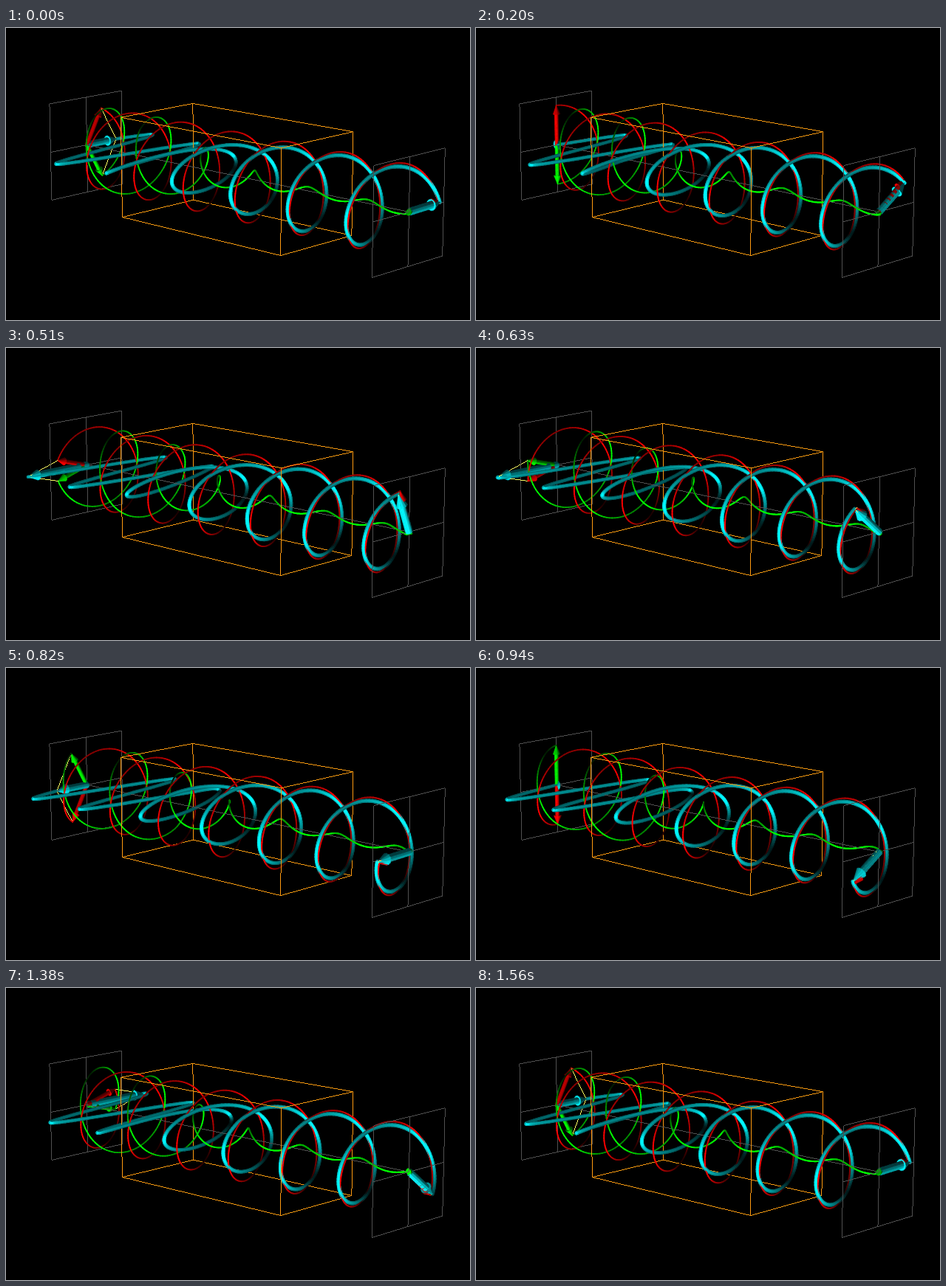
Recreate the animation shown at these times as an HTML page with a canvas. Size 628 by 396 pixels, loop 1620 ms.

```html
<!DOCTYPE html>
<html>
<head>
<meta charset="utf-8">
<style>
html, body { margin: 0; width: 100%; height: 100%; overflow: hidden; background: #000; }
canvas { display: block; }
</style>
</head>
<body>
<canvas id="stage" width="628" height="396"></canvas>
<script>
const ctx = document.getElementById('stage').getContext('2d');
const RAD = Math.PI / 180, LOOP = 1620;
const RADIUS = 0.83, START = 60, PHASE = 2200, TWIST = 32, DECAY = 5.1, DEPTH = 8.7;
const BOX = [0.249, 0.7465];
const LIGHT = [-0.83, -0.42, 0.36], VIEW = [0.61, -0.22, -0.76];
const RED = [255, 0, 0], GREEN = [0, 255, 0], CYAN = [0, 248, 255];
const GREY = '#505050', ORANGE = '#ff9a10', YELLOW = '#ffff60';
let items = [];

// x and y span the wave planes (-1..1), z runs along the axis (0..1)
function project([x, y, z]) {
  const w = 1 + 0.0168 * x - 0.0057 * y - 0.146 * z;
  return [(109 + 50.1 * x - 1.8 * y + 356.4 * z) / w,
          (158 - 7.2 * x - 65.1 * y + 54.6 * z) / w, w];
}
const dot = (a, b) => a[0] * b[0] + a[1] * b[1] + a[2] * b[2];
const unit = v => v.map(c => c / (Math.hypot(...v) || 1));
const mix = (a, b, t) => a.map((c, i) => c + (b[i] - c) * t);
const tint = (rgb, i) => `rgb(${rgb.map(c => Math.round(c * Math.min(1, i)))})`;

function addLine(a, b, color, width, bias = 0) {
  const p = project(a), q = project(b);
  items.push({ p: [p, q], color, width, w: (p[2] + q[2]) / 2 + bias });
}
function addWire(a, b, color, parts = 24) {
  for (let i = 0; i < parts; i++) addLine(mix(a, b, i / parts), mix(a, b, (i + 1) / parts), color, 1);
}
function addFace(points, normal, rgb) {
  if (dot(normal, VIEW) > 0) return;
  const p = points.map(project);
  const light = 0.25 + 0.85 * Math.max(0, dot(unit(normal), LIGHT));
  items.push({ p, color: tint(rgb, light), w: p.reduce((s, q) => s + q[2], 0) / p.length });
}

// The medium absorbs the green wave and shifts both phases in opposite ways
function fields(z, step) {
  const inside = Math.min(BOX[1] - BOX[0], Math.max(0, z - BOX[0]));
  const a = START + 15 * step - PHASE * z, shift = TWIST * inside;
  const fade = RADIUS * Math.exp(-DECAY * inside);
  const polar = (r, deg) => [r * Math.cos(deg * RAD), r * Math.sin(deg * RAD), z];
  const red = polar(RADIUS, a - shift), green = polar(fade, -a - shift);
  return { red, green, sum: [red[0] + green[0], red[1] + green[1], z] };
}

function addTube(curve, rgb, width) {
  const n = 520;
  let a = curve(0);
  for (let i = 1; i <= n; i++) {
    const b = curve(i / n);
    const along = dot(unit([b[0] - a[0], b[1] - a[1], (b[2] - a[2]) * DEPTH]), LIGHT);
    const s = Math.sqrt(Math.max(0, 1 - along * along));
    const light = 0.85 * s + 0.3 * s ** 20;
    const size = width / project(a)[2];
    if (width > 3) {
      addLine(a, b, tint(rgb, light * 0.8), size, 0.003);
      addLine(a, b, tint(rgb, light * 1.05), size * 0.5, -0.003);
    } else addLine(a, b, tint(rgb, light), size);
    a = b;
  }
}

function addArrow(tip, rgb, shaft, head, headLength) {
  const [x, y, z] = tip, length = Math.hypot(x, y) || 1e-6;
  const ux = x / length, uy = y / length, n = 12;
  const base = Math.max(0, length - headLength);
  const side = i => {
    const a = i * 2 * Math.PI / n;
    return [-uy * Math.cos(a), ux * Math.cos(a), Math.sin(a)];
  };
  const at = (d, r, i) => {
    const s = side(i);
    return [ux * d + s[0] * r, uy * d + s[1] * r, z + s[2] * r / DEPTH];
  };
  const rim = [], slope = head / headLength;
  for (let i = 0; i < n; i++) {
    const m = side(i + 0.5), j = i + 1;
    for (let k = 0; k < 6 && base; k++) {
      const d = base * k / 6, e = base * (k + 1) / 6;
      addFace([at(d, shaft, i), at(e, shaft, i), at(e, shaft, j), at(d, shaft, j)], m, rgb);
    }
    addFace([at(base, head, i), at(base, head, j), tip], [m[0] + ux * slope, m[1] + uy * slope, m[2]], rgb);
    rim.push(at(base, head, i));
  }
  addFace(rim, [-ux, -uy, 0], rgb);
}

function addScenery() {
  for (const z of [0, 1])
    for (const c of [-1, 0, 1]) {
      addWire([c, -1, z], [c, 1, z], GREY);
      addWire([-1, c, z], [1, c, z], GREY);
    }
  addWire([0, 0, 0], [0, 0, 1], GREY, 90);
  for (const a of [-1, 1]) {
    for (const b of [-1, 1]) addWire([a, b, BOX[0]], [a, b, BOX[1]], ORANGE, 60);
    for (const z of BOX) {
      addWire([a, -1, z], [a, 1, z], ORANGE);
      addWire([-1, a, z], [1, a, z], ORANGE);
    }
  }
}

// One pixel per column or row, without smoothing
function drawPixels([p, q]) {
  const major = Math.abs(q[0] - p[0]) > Math.abs(q[1] - p[1]) ? 0 : 1;
  const [a, b] = p[major] < q[major] ? [p, q] : [q, p];
  for (let i = Math.ceil(a[major]); i <= b[major]; i++) {
    const [x, y] = mix(a, b, (i - a[major]) / (b[major] - a[major]));
    ctx.fillRect(Math.round(x), Math.round(y), 1, 1);
  }
}

function draw(step) {
  items = [];
  addScenery();
  addTube(z => fields(z, step).red, RED, 1.8);
  addTube(z => fields(z, step).green, GREEN, 1.8);
  addTube(z => fields(z, step).sum, CYAN, 4.6);
  for (const z of [0, 1]) {
    const { red, green, sum } = fields(z, step);
    addArrow(red, RED, 0.038, 0.075, 0.18);
    addArrow(green, GREEN, 0.038, Math.min(0.075, Math.hypot(green[0], green[1])), 0.18);
    addArrow(sum, CYAN, 0.065, 0.105, 0.25);
    addWire(red, sum, YELLOW);
    addWire(green, sum, YELLOW);
  }
  items.sort((a, b) => b.w - a.w);

  ctx.fillStyle = '#000';
  ctx.fillRect(0, 0, 628, 396);
  ctx.lineCap = 'round';
  for (const { p, color, width } of items) {
    ctx.fillStyle = ctx.strokeStyle = color;
    if (width === 1) { drawPixels(p); continue; }
    ctx.beginPath();
    p.forEach(([x, y]) => ctx.lineTo(x + 0.5, y + 0.5));
    ctx.lineWidth = width || 0.5;
    if (!width) { ctx.closePath(); ctx.fill(); }
    ctx.stroke();
  }
}

// Bursts of four steps, each followed by a longer hold that skips one
function stepAt(t) {
  if (t < 200) return 0;
  const u = t - 140;
  return 1 + 5 * Math.floor(u / 310) + Math.min(3, Math.floor(u % 310 / 60));
}

let shown = -1;
function tick() {
  const step = stepAt(performance.now() % LOOP) % 24;
  if (step !== shown) draw(shown = step);
  requestAnimationFrame(tick);
}
tick();
</script>
</body>
</html>
```
